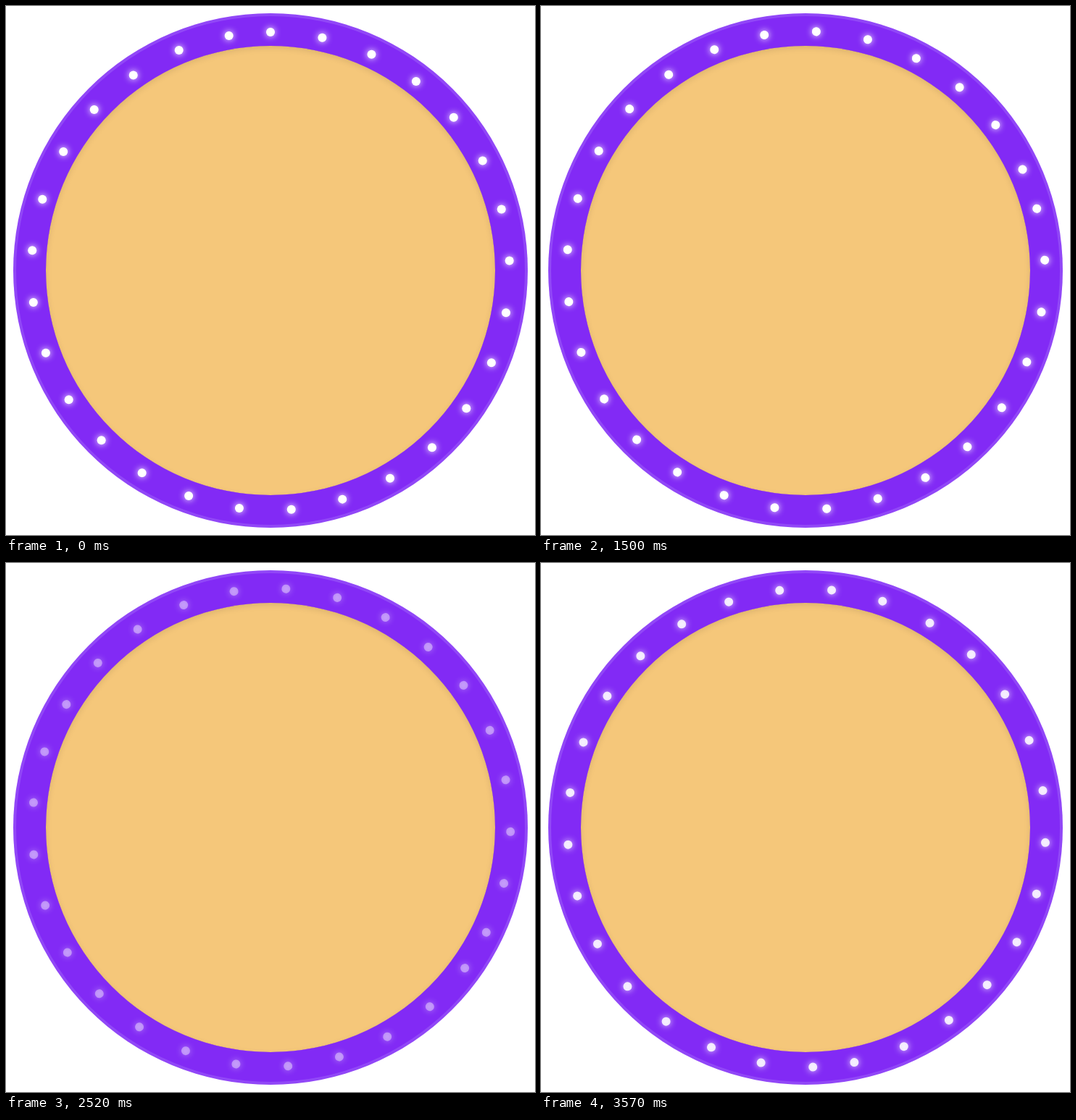
Animation of 730 by 730 pixels, one loop 3.6 s. Source, as an HTML page with a canvas:

```html
<!DOCTYPE html>
<html lang="en">
<head>
<meta charset="utf-8">
<title>Marquee ring</title>
<style>
html, body { margin: 0; width: 100%; height: 100%; overflow: hidden; background: #fff; }
canvas { display: block; width: 730px; height: 730px; }
</style>
</head>
<body>
<canvas id="stage" width="730" height="730"></canvas>
<script>
const ctx = document.getElementById('stage').getContext('2d');
const CENTER = 365;
const LOOP = 3600, TICK = 30, BLINK = 300;
const BULBS = 29, STEP = 12.5, ORBIT = 330;
const PIVOT = 365.8;
const rad = deg => deg * Math.PI / 180;

function disc(x, y, r, color) {
  ctx.fillStyle = color;
  ctx.beginPath();
  ctx.arc(x, y, r, 0, 2 * Math.PI);
  ctx.fill();
}

// Soft shade cast by the rim onto the face
function innerShade() {
  ctx.save();
  ctx.beginPath();
  ctx.arc(CENTER, CENTER, 310, 0, 2 * Math.PI);
  ctx.clip();
  ctx.shadowColor = 'rgba(0,0,0,0.1)';
  ctx.shadowBlur = 8;
  ctx.shadowOffsetY = 3;
  ctx.fillStyle = '#822af5';
  ctx.beginPath();
  ctx.arc(CENTER, CENTER, 345, 0, 2 * Math.PI);
  ctx.arc(CENTER, CENTER, 310, 0, 2 * Math.PI, true);
  ctx.fill();
  ctx.restore();
}

function bulbs(angle, glow) {
  ctx.save();
  ctx.translate(PIVOT, PIVOT);
  ctx.rotate(rad(angle));
  // The ring of bulbs sits slightly off its pivot
  ctx.translate(-0.8, 0.1);
  ctx.globalAlpha = glow;
  ctx.shadowColor = '#fff';
  ctx.shadowBlur = 10;
  for (let i = 0; i < BULBS; i++) {
    const a = rad(i * STEP);
    disc(ORBIT * Math.sin(a), -ORBIT * Math.cos(a), 6, '#fff');
  }
  ctx.restore();
}

function draw(now) {
  const t = Math.floor((now % LOOP) / TICK) * TICK;
  const phase = (t % BLINK) / BLINK;
  const glow = 0.25 + 0.75 * Math.abs(1 - 2 * phase);
  ctx.clearRect(0, 0, 730, 730);
  disc(CENTER, CENTER, 355, '#9147f7');
  disc(CENTER, CENTER, 351, '#822af5');
  disc(CENTER, CENTER, 310, '#f5c77a');
  innerShade();
  bulbs(180 * t / LOOP, glow);
}

const start = performance.now();
function frame() {
  draw(performance.now() - start);
  requestAnimationFrame(frame);
}
frame();
</script>
</body>
</html>
```
